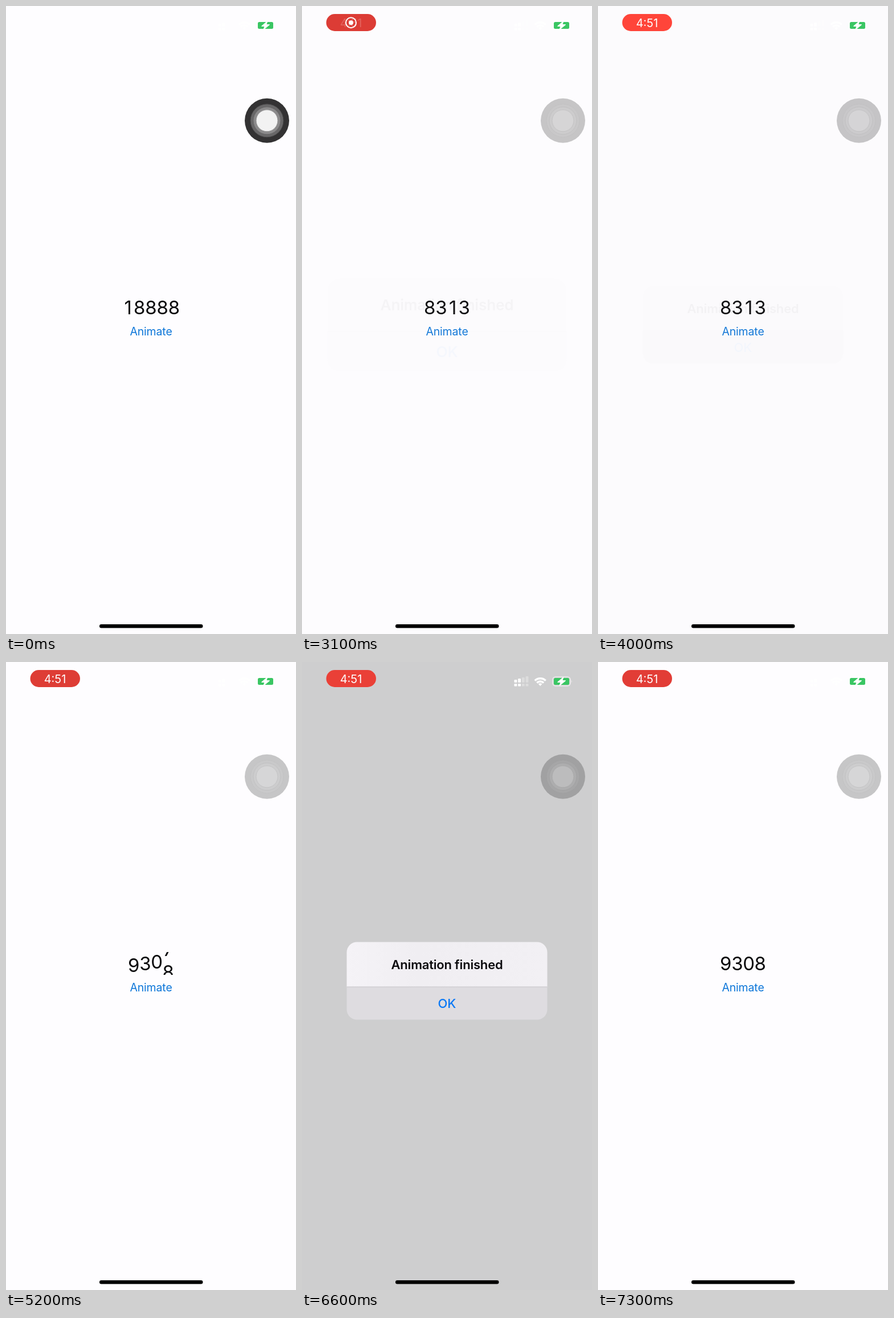
Animation of 509x1100 px, one loop 7.4 s. Source, as an HTML page:

```html
<!DOCTYPE html>
<html lang="en">
<head>
<meta charset="utf-8">
<title>Rolling counter</title>
<style>
  html, body { margin: 0; width: 100%; height: 100%; overflow: hidden; background: #fefdff; }
  svg { display: block; width: 100vw; height: 100vh; }
  text { font-family: Inter, sans-serif; text-anchor: middle; }
  .digit { font-size: 33px; fill: #09090b; }
  .action { font-size: 19.5px; letter-spacing: -.15px; fill: #0f77d9; }
  .title { font-size: 22px; font-weight: 600; letter-spacing: -.2px; fill: #0b0a0d; }
  .ok { font-size: 22px; font-weight: 500; fill: #0b79f5; }
  .time { font-size: 20px; fill: #fff; }
</style>
</head>
<body>
<svg viewBox="0 0 509 1100">
  <defs>
    <clipPath id="window"><rect x="150" y="508" width="209" height="40"/></clipPath>
    <clipPath id="card"><rect x="78.5" y="490.5" width="352" height="136" rx="18"/></clipPath>
    <linearGradient id="sheen">
      <stop offset="0" stop-color="#f5f3f7"/>
      <stop offset=".35" stop-color="#f0eef2"/>
      <stop offset="1" stop-color="#f2f0f4"/>
    </linearGradient>
  </defs>

  <rect width="509" height="1100" fill="#fefdff"/>
  <g clip-path="url(#window)"><g id="counter"></g></g>
  <text class="action" x="254.5" y="577">Animate</text>

  <rect id="dim" width="509" height="1100" fill="#000"/>
  <g id="alert">
    <g clip-path="url(#card)">
      <rect x="78" y="490" width="353" height="79" fill="url(#sheen)"/>
      <rect x="78" y="569" width="353" height="58" fill="#dedce0"/>
      <rect x="78" y="568.5" width="353" height="1" fill="#c7c5c9"/>
    </g>
    <text class="title" x="254.5" y="537.5">Animation finished</text>
    <text class="ok" x="254.5" y="606">OK</text>
  </g>

  <g id="signal" fill="#fff"></g>
  <g fill="none" stroke="#fff" stroke-width="3.4">
    <path d="M408.7 32.6a13.6 13.6 0 0 1 19 0"/>
    <path d="M412.3 36.4a8.6 8.6 0 0 1 11.8 0"/>
    <path d="M418.2 42l-3.2-3.4a4.6 4.6 0 0 1 6.4 0z" fill="#fff" stroke="none"/>
  </g>
  <rect x="440" y="26" width="31" height="16" rx="5" fill="none" stroke="#fff" stroke-opacity=".6" stroke-width="1.6"/>
  <path d="M472.6 31.5q2 2.4 0 5z" fill="#fff" fill-opacity=".6"/>
  <rect x="442" y="28" width="27" height="12" rx="2.5" fill="#3ac663"/>
  <path d="M458.6 27L449 35.2h5.4L452.2 41l10-8.4h-5.6z" fill="#fff" stroke="#fff" stroke-width="1.4" stroke-linejoin="round"/>

  <g id="pill">
    <rect id="pillFill" x="42.5" y="14" width="87.5" height="30" rx="15"/>
    <g id="rec" fill="none" stroke="#fff" stroke-width="2">
      <circle cx="86" cy="29.2" r="9"/>
      <circle cx="86" cy="29.2" r="4" fill="#fff" stroke="none"/>
    </g>
    <text id="clock" class="time" x="86" y="36.6">4:51</text>
  </g>

  <g id="knob"></g>
  <rect x="164" y="1083" width="181.5" height="6.4" rx="3.2" fill="#000"/>
</svg>

<script>
const LOOP = 7400, STEP = 100, PITCH = 20.2, ROW = 40, MID = 254.5;
const $ = id => document.getElementById(id);
const clamp = x => Math.min(1, Math.max(0, x));
const span = (t, start, length) => clamp((t - start) / length);
const smooth = x => x * x * (3 - 2 * x);
const easeOut = (x, power) => 1 - (1 - x) ** power;
const mix = (a, b, p) => a + (b - a) * p;

function add(parent, tag, attrs, text = '') {
  const el = document.createElementNS('http://www.w3.org/2000/svg', tag);
  for (const key in attrs) el.setAttribute(key, attrs[key]);
  el.textContent = text;
  return parent.appendChild(el);
}

// Vertical strips of 0-9, one for each place of the counter
const strips = Array.from({ length: 5 }, () => {
  const strip = add($('counter'), 'g', {});
  for (let n = 0; n < 10; n++) add(strip, 'text', { class: 'digit', y: 540 + n * ROW }, n);
  return strip;
});

for (let i = 0; i < 4; i++) {
  const x = 372.5 + i * 6.7, h = 5 + i * 2, opacity = i < 2 ? 1 : .3;
  add($('signal'), 'rect', { x, y: 36 - h, width: 4.8, height: h, rx: 1.2, opacity });
  add($('signal'), 'rect', { x, y: 38, width: 4.8, height: 4.6, rx: 1.2, opacity });
}

// Floating button: radius, fill, edge, opacity when touched and at rest
const rings = [
  [39, '#000', 'none', .8, .22],
  [29, '#fff', '#888', .26, .06],
  [24, '#fff', '#666', .23, .08],
  [19, '#fff', '#999', .89, .19]
].map(([r, fill, stroke, on, off]) => ({
  el: add($('knob'), 'circle', { cx: 458, cy: 200.8, r, fill, stroke }), on, off
}));

const rolls = [
  { start: 2000, from: '8888', to: '8313' },
  { start: 4550, from: '8313', to: '9308' }
];
const alerts = [
  { show: 3060, hide: 3815 },
  { show: 5660, hide: 6800 }
];

function drawCounter(t) {
  const roll = rolls.filter(r => t >= r.start).pop() || { start: 0, from: '18888', to: '18888' };
  const p = easeOut(span(t, roll.start, 1050), 2.7);
  const count = roll.to.length;
  strips.forEach((strip, i) => {
    strip.style.display = i < count ? '' : 'none';
    if (i >= count) return;
    const value = mix(+roll.from[i], +roll.to[i], p);
    const x = MID + (i - (count - 1) / 2) * PITCH;
    strip.setAttribute('transform', `translate(${x} ${-value * ROW})`);
  });
}

function drawAlert(t) {
  const { show, hide } = t < 5000 ? alerts[0] : alerts[1];
  const shown = smooth(span(t, show, 400));
  const alpha = shown * (1 - easeOut(span(t, hide, 320), 4));
  const scale = mix(1.2, 1, shown);
  $('dim').setAttribute('opacity', .19 * alpha);
  $('alert').setAttribute('opacity', alpha);
  $('alert').setAttribute('transform',
    `translate(${MID} 558.5) scale(${scale}) translate(${-MID} -558.5)`);
}

function drawPill(t) {
  const glow = (1 - Math.cos((t - 3040) / 1000 * Math.PI)) / 2;
  const channel = (a, b) => Math.round(mix(a, b, glow));
  $('pillFill').setAttribute('fill', `rgb(${channel(220, 255)},${channel(60, 69)},${channel(53, 58)})`);
  $('pill').setAttribute('opacity', span(t, 150, 350));
  $('rec').setAttribute('opacity', 1 - span(t, 3100, 250));
  $('clock').setAttribute('opacity', span(t, 3040, 300));
}

function draw(now) {
  const t = Math.floor(now % LOOP / STEP) * STEP;
  drawCounter(t);
  drawAlert(t);
  drawPill(t);
  const rest = smooth(span(t, 100, 600));
  rings.forEach(({ el, on, off }) => el.setAttribute('opacity', mix(on, off, rest)));
}

const began = performance.now();
(function tick() {
  draw(performance.now() - began);
  requestAnimationFrame(tick);
})();
</script>
</body>
</html>
```
